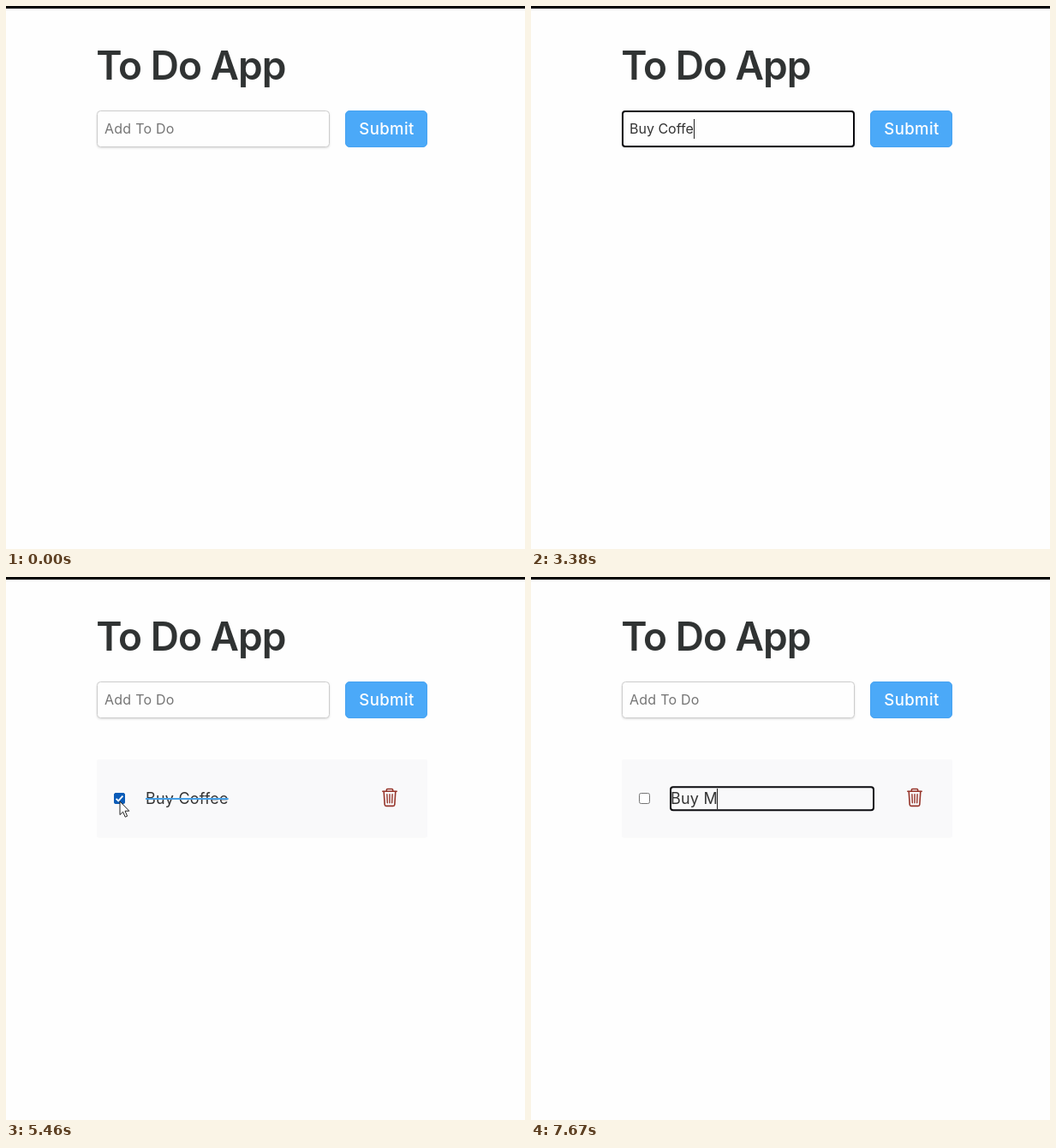
An HTML page that plays this animation: 606x634 px, repeating every 8 s.

```html
<!DOCTYPE html>
<html lang="en">
<head>
<meta charset="utf-8">
<title>To Do App</title>
<style>
  html, body { margin: 0; width: 100%; height: 100%; overflow: hidden; background: #fefefe; }
  svg { display: block; width: 606px; height: 634px; }
  text {
    font: 400 16px Inter, "Open Sans", sans-serif;
    font-optical-sizing: none;
    fill: #333;
    white-space: pre;
  }
  #title { font-size: 46px; font-weight: 640; letter-spacing: -1px; fill: #303333; }
  #submit { font-size: 18.5px; font-weight: 450; letter-spacing: .4px; fill: #fff; text-anchor: middle; }
  #placeholder { fill: #757575; letter-spacing: .25px; }
  #label, #picked { font-size: 18px; letter-spacing: .2px; }
  #picked { fill: #fff; }
  .field { fill: #fefefe; stroke: #ccc; filter: drop-shadow(0 1px 1px rgba(0, 0, 0, .13)); }
  .button { fill: #4ba9f8; stroke: #48a3f1; }
  .focus { fill: none; stroke: #0b0b0f; stroke-width: 2; }
  .caret { fill: #222; }
  .icon { fill: none; stroke: #96352a; stroke-width: 1.6; stroke-linecap: round; stroke-linejoin: round; }
</style>
</head>
<body>
<svg viewBox="0 0 606 634">
  <rect width="606" height="634" fill="#fefefe"/>
  <rect width="606" height="3" fill="#000"/>
  <text id="title" x="105.3" y="86">To Do App</text>

  <rect class="field" x="106.5" y="122.5" width="271" height="42" rx="4"/>
  <rect id="inputFocus" class="focus" x="107" y="123" width="270" height="41" rx="3"/>
  <text id="placeholder" x="115" y="149">Add To Do</text>
  <text id="typed" x="115" y="149"></text>
  <rect id="inputCaret" class="caret" y="132" width="1" height="23"/>

  <rect class="button" x="396.5" y="122.5" width="95" height="42" rx="4.5"/>
  <text id="submit" x="444.5" y="150">Submit</text>

  <g id="item">
    <rect x="106" y="213" width="386" height="91.5" rx="2" fill="#f9f9fa"/>
    <rect x="126.5" y="252.5" width="12" height="12" rx="2" fill="#fff" stroke="#767676"/>
    <g id="check">
      <rect x="126" y="252" width="13" height="13" rx="2.5" fill="#0b5cb8"/>
      <path d="M128.6 258.8l2.6 2.6 5.2-5.8" fill="none" stroke="#fff" stroke-width="1.8"/>
    </g>
    <rect id="selection" y="246" height="26" fill="#3390ff"/>
    <text id="label" x="163" y="265"></text>
    <text id="picked" y="265"></text>
    <rect id="strike" x="163" y="258" height="2" fill="#459fe6"/>
    <rect id="editFocus" class="focus" x="163" y="245.3" width="237" height="27" rx="3"/>
    <rect id="editCaret" class="caret" y="247" width="1" height="24"/>
    <g class="icon">
      <path d="M439.8 250.3h16.4M444.3 250v-1.2q0-1.3 1.3-1.3h4.8q1.3 0 1.3 1.3v1.2"/>
      <path d="M441.2 250.5l1 15.2q.1 1.7 1.8 1.7h8q1.7 0 1.8-1.7l1-15.2"/>
      <path d="M444.9 253.8l.4 10M448 253.8v10M451.1 253.8l-.4 10" stroke-width="1.4"/>
    </g>
  </g>
  <path id="cursor" d="M0 0V15.6L3.6 12.2 6.2 18.2 8.6 17.2 6 11.2H10.8Z" fill="#fff" stroke="#222" stroke-linejoin="round"/>
</svg>
<script>
const LOOP = 8000;
const start = {
  typed: '', focus: false, caret: false, item: false, checked: false,
  label: 'Buy Coffee', edit: false, editCaret: false, select: 0, cursor: null
};

// Each step changes only the listed parts of the state.
const steps = [
  [130, { cursor: [262, 243] }],
  [260, { cursor: [254, 206] }],
  [390, { cursor: [250, 168] }],
  [520, { cursor: null, focus: true, caret: true }],
  [1040, { caret: false }],
  [1430, { typed: 'B', caret: true }],
  [1560, { typed: 'Bu' }],
  [1820, { typed: 'Buy' }],
  [1950, { typed: 'Buy ' }],
  [2340, { typed: 'Buy C' }],
  [2470, { typed: 'Buy Co' }],
  [2860, { typed: 'Buy Cof' }],
  [2990, { typed: 'Buy Coff' }],
  [3380, { typed: 'Buy Coffe' }],
  [3510, { typed: 'Buy Coffee' }],
  [3770, { typed: '', item: true }],
  [4160, { caret: false }],
  [4550, { cursor: [172, 288] }],
  [4680, { cursor: [154, 279], caret: true }],
  [4810, { cursor: [139, 268] }],
  [4940, { cursor: [133, 262] }],
  [5200, { focus: false, caret: false }],
  [5330, { checked: true }],
  [5720, { checked: false }],
  [5850, { cursor: [150, 262] }],
  [5980, { cursor: null }],
  [6760, { edit: true, select: 1 }],
  [6890, { select: 4 }],
  [7020, { select: 6 }],
  [7670, { label: 'Buy M', select: 0, editCaret: true }]
];

const el = id => document.getElementById(id);
const show = (id, on) => el(id).setAttribute('display', on ? 'inline' : 'none');
const set = (id, name, value) => el(id).setAttribute(name, value);

function measure(id, text) {
  el(id).textContent = text;
  return text ? el(id).getComputedTextLength() : 0;
}

function render(s) {
  show('item', true); // text can only be measured while it is displayed
  show('inputFocus', s.focus);
  show('placeholder', !s.typed);
  show('inputCaret', s.caret);
  set('inputCaret', 'x', Math.round(115 + measure('typed', s.typed)));

  const from = 163 + measure('label', 'Buy ');
  const width = measure('label', s.label);
  const picked = s.label.slice(4, 4 + s.select);
  set('picked', 'x', from);
  set('selection', 'x', from);
  set('selection', 'width', measure('picked', picked));
  set('strike', 'width', width);
  set('editCaret', 'x', Math.round(162 + width));
  show('check', s.checked);
  show('strike', s.checked);
  show('editFocus', s.edit);
  show('editCaret', s.editCaret);
  show('item', s.item);

  show('cursor', s.cursor);
  if (s.cursor) set('cursor', 'transform', `translate(${s.cursor})`);
}

const origin = performance.now();
let shown = -1;
function tick() {
  const t = (performance.now() - origin) % LOOP;
  const count = steps.filter(([at]) => at <= t).length;
  if (count !== shown) {
    shown = count;
    render(Object.assign({}, start, ...steps.slice(0, count).map(step => step[1])));
  }
  requestAnimationFrame(tick);
}
tick();
</script>
</body>
</html>
```
